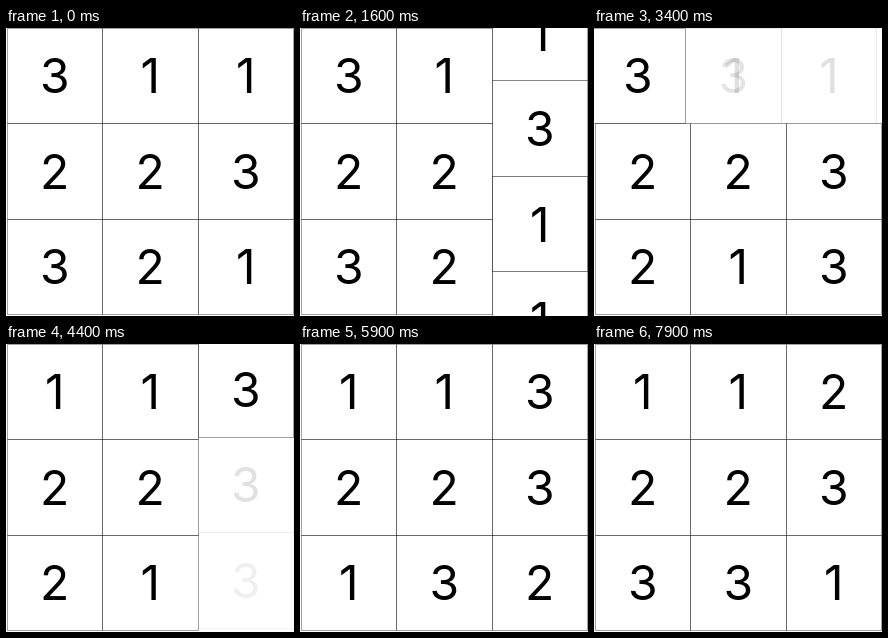
An HTML page with a canvas for the animation above (8 s loop, 288 px wide and 288 px high).

```html
<!DOCTYPE html>
<html>
<head>
<meta charset="utf-8">
<style>
html, body { margin: 0; width: 100%; height: 100%; overflow: hidden; background: #fff; }
canvas { display: block; }
</style>
</head>
<body>
<canvas id="stage" width="288" height="288"></canvas>
<script>
const ctx = document.getElementById('stage').getContext('2d');
const LOOP = 8000, STEP = 100, SLIDE = 500, CELL = 95.5;
const START = [[3, 1, 1], [2, 2, 3], [3, 2, 1]];

// One rotation per second; dir 1 goes left or up, -1 goes down.
const col = (dir, phase = 0.136) => ({ vertical: true, index: 2, dir, phase });
const row = index => ({ vertical: false, index, dir: 1, phase: 0.136 });
const MOVES = [col(1), col(-1), row(2), row(0), col(1, 0.095), row(2), col(-1), row(2)];

const onLine = (m, r, c) => (m.vertical ? c : r) === m.index;

function readLine(grid, m) {
  const line = m.vertical ? grid.map(r => r[m.index]) : [...grid[m.index]];
  return m.dir > 0 ? line : line.reverse();
}

function rotate(grid, m) {
  const [first, ...rest] = readLine(grid, m);
  const line = [...rest, first];
  if (m.dir < 0) line.reverse();
  return grid.map((r, y) => r.map((v, x) => onLine(m, y, x) ? line[m.vertical ? y : x] : v));
}

function drawCell(value, c, r, alpha = 1, fill = false) {
  const edgeX = i => Math.floor(1 + CELL * i) + 0.5;
  const edgeY = i => Math.floor(CELL * i) + 0.5;
  const x = edgeX(c), y = edgeY(r);
  const w = edgeX(c + 1) - x, h = edgeY(r + 1) - y;
  ctx.globalAlpha = alpha;
  if (fill) {
    ctx.fillStyle = '#fff';
    ctx.fillRect(x, y, w, h);
  }
  ctx.strokeStyle = 'rgba(0,0,0,.36)';
  ctx.strokeRect(x, y, w, h);
  ctx.fillStyle = '#000';
  ctx.fillText(value, 1 + CELL * (c + 0.5), CELL * (r + 0.5) + 17.5);
}

function drawSlide(grid, m, u) {
  const p = u * u * (3 - 2 * u);
  const fade = Math.min(1, 2.4 * p);
  const [first, ...rest] = readLine(grid, m);
  const put = (value, slot, alpha) => {
    const pos = m.dir > 0 ? slot - p : 2 - slot + p;
    drawCell(value, m.vertical ? m.index : pos, m.vertical ? pos : m.index, alpha, true);
  };
  put(first, 1, fade);
  [...rest, first].forEach((value, i) => put(value, i + 1, fade));
  put(first, 0, 1);
}

function draw(now) {
  const t = Math.floor(now % LOOP / STEP) * STEP;
  let grid = START, active = null, u = 0;
  MOVES.forEach((m, i) => {
    const since = t - (400 + 1000 * i);
    if (since >= SLIDE) grid = rotate(grid, m);
    else if (since >= 0) {
      active = m;
      u = m.phase + since / SLIDE;
    }
  });

  ctx.globalAlpha = 1;
  ctx.fillStyle = '#fff';
  ctx.fillRect(0, 0, 288, 288);
  ctx.font = '48px Inter, sans-serif';
  ctx.textAlign = 'center';
  if (active) drawSlide(grid, active, u);
  grid.forEach((line, r) => line.forEach((value, c) => {
    if (!active || !onLine(active, r, c)) drawCell(value, c, r);
  }));
}

const begin = performance.now();
function tick() {
  draw(performance.now() - begin);
  requestAnimationFrame(tick);
}
tick();
</script>
</body>
</html>
```
